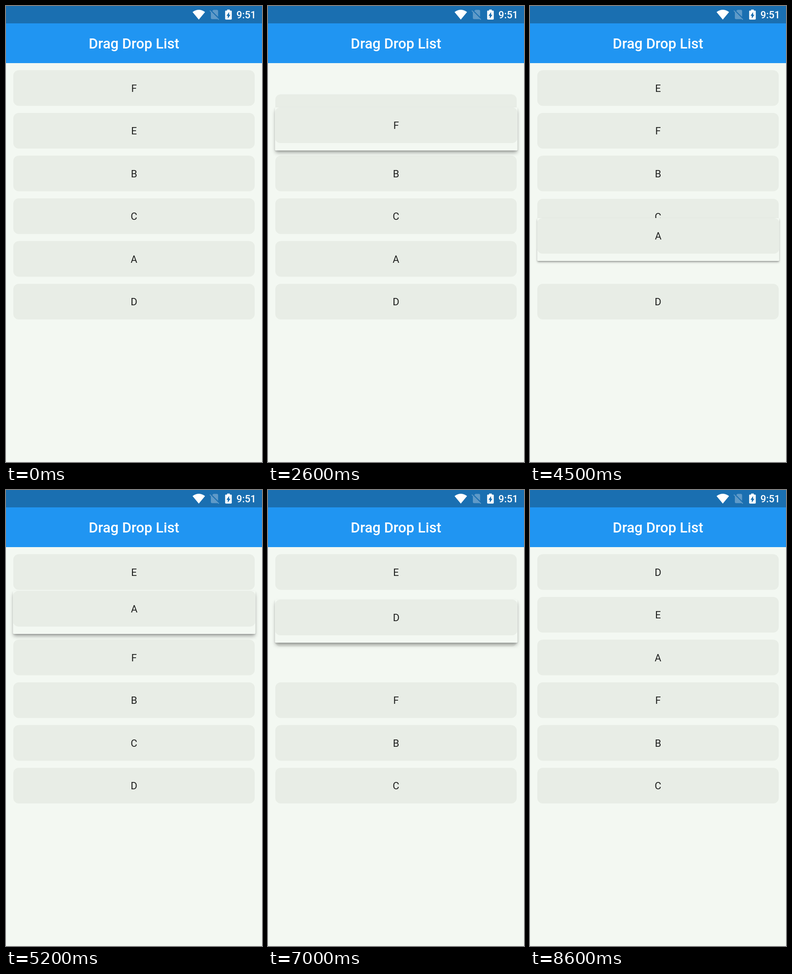
Animation, 561 px wide and 998 px high, one loop 8700 ms. Source, as an HTML page:

```html
<!DOCTYPE html>
<html lang="en">
<head>
<meta charset="utf-8">
<title>Drag Drop List</title>
<style>
  html, body { margin: 0; width: 100%; height: 100%; overflow: hidden; }
  body { position: relative; background: #f3f8f2; font-family: Roboto, sans-serif; }
  .status, .bar { position: absolute; left: 0; width: 561px; }
  .status { top: 0; height: 37.5px; background: #1a6fb1; z-index: 5; }
  .bar {
    top: 37.5px; height: 87px; background: #2095f2; color: #fff; z-index: 4;
    font-size: 31.2px; font-weight: 500; line-height: 89px; text-align: center;
  }
  .status svg { position: absolute; left: 0; top: 0; }
  .clock {
    position: absolute; right: 13px; top: 0; color: #fff;
    font-size: 21.8px; font-weight: 500; line-height: 40px;
  }
  .tile {
    position: absolute; left: 15.6px; top: 0; width: 529.8px; height: 93.5px;
    border-radius: 2px;
  }
  .tile.held { background: #f3f8f2; z-index: 2; }
  .card {
    height: 77.9px; border-radius: 12px; background: #e8ede6; color: #1c1d1c;
    font-size: 22px; line-height: 79px; text-align: center;
  }
</style>
</head>
<body>
<div class="status">
  <svg width="561" height="38" fill="#fff">
    <path d="M408.8 13.2Q422.5 3.4 436.2 13.2L422.5 29.8Z"/>
    <path transform="translate(443.3 5) scale(1.13)" opacity=".3" d="M19 5c0-1.1-.9-2-2-2h-7L7.66 5.34 19 16.68zM3.65 3.88 2.38 5.15 5 7.77V19c0 1.1.9 2 2 2h10c.35 0 .67-.1.96-.26l1.88 1.88 1.27-1.27z"/>
    <path transform="translate(470.1 5.6) scale(1.45 1.1)" d="M15.67 4H14V2h-4v2H8.33C7.6 4 7 4.6 7 5.33v15.34C7 21.4 7.6 22 8.33 22h7.34c.73 0 1.33-.6 1.33-1.33V5.33C17 4.6 16.4 4 15.67 4zM11 20v-5.5H9L13 7v5.5h2z"/>
  </svg>
  <div class="clock">9:51</div>
</div>
<div class="bar">Drag Drop List</div>
<script>
const LOOP = 8700, STEP = 100, PITCH = 93.5, SHIFT = 210;
const rowTop = row => 140.5 + row * PITCH;
const clamp = v => Math.min(1, Math.max(0, v));
const smooth = v => v * v * (3 - 2 * v);

// Each path lists [time, top] of the held tile.
const drags = [
  { from: 0, to: 1, lift: 2350, drop: 3100, path: [
    [2300, rowTop(0)], [2400, 152], [2500, 186], [2600, 222], [2700, 235],
    [2900, 237], [3100, rowTop(1)], [3500, rowTop(1)]] },
  { from: 4, to: 1, lift: 4370, drop: 5500, path: [
    [4300, rowTop(4)], [4400, 492], [4500, 464], [4600, 412], [4800, 308],
    [4900, 266], [5000, 238], [5100, 225], [5200, 220.8], [5500, 220.8],
    [5700, rowTop(1)], [5900, rowTop(1)]] },
  { from: 5, to: 0, lift: 6570, drop: 7550, path: [
    [6400, rowTop(5)], [6500, 555], [6600, 489], [6800, 350], [6900, 290],
    [7000, 240], [7100, 195], [7200, 162], [7300, 140], [7400, 131],
    [7500, 128.8], [7750, rowTop(0)], [7950, rowTop(0)]] }
];

function topAt(path, t) {
  const i = path.findIndex(p => p[0] > t);
  if (i < 0) return path[path.length - 1][1];
  if (i === 0) return path[0][1];
  const [t0, y0] = path[i - 1], [t1, y1] = path[i];
  return y0 + (y1 - y0) * (t - t0) / (t1 - t0);
}

// A row gives way once the held tile is half a row from its place.
for (const drag of drags) {
  drag.dir = Math.sign(drag.to - drag.from);
  drag.start = drag.path[0][0];
  drag.end = drag.path[drag.path.length - 1][0];
  drag.passed = {};
  for (let row = drag.from + drag.dir; row !== drag.to + drag.dir; row += drag.dir) {
    const edge = rowTop(row) - drag.dir * PITCH / 2;
    let t = drag.start;
    while (t < drag.end && drag.dir * (topAt(drag.path, t) - edge) < 0) t++;
    drag.passed[row] = t;
  }
}

const tiles = {};
for (const letter of "FEBCAD") {
  const tile = document.createElement("div");
  tile.className = "tile";
  tile.innerHTML = `<div class="card">${letter}</div>`;
  document.body.append(tile);
  tiles[letter] = tile;
}

function place(tile, y, height = 0, held = false) {
  tile.classList.toggle("held", held);
  tile.style.transform = `translateY(${y}px) scale(${1 + 0.003 * height})`;
  tile.style.boxShadow = height
    ? `0 ${6 * height}px ${8 * height}px ${-1.5 * height}px rgba(0,0,0,.34),` +
      `0 ${1.5 * height}px ${3 * height}px rgba(0,0,0,.15)`
    : "none";
}

function draw(t) {
  const order = [..."FEBCAD"];
  let active = null;
  for (const drag of drags) {
    if (t >= drag.end) order.splice(drag.to, 0, order.splice(drag.from, 1)[0]);
    else if (t >= drag.start) active = drag;
  }
  order.forEach((letter, row) => {
    const tile = tiles[letter];
    if (active && row === active.from) {
      const height = clamp((t - active.lift) / 250) * clamp(1 - (t - active.drop) / 400);
      place(tile, topAt(active.path, t), height, true);
    } else if (active && row in active.passed) {
      const moved = smooth(clamp((t - active.passed[row]) / SHIFT));
      place(tile, rowTop(row) - active.dir * PITCH * moved);
    } else {
      place(tile, rowTop(row));
    }
  });
}

const begin = performance.now();
function tick() {
  const t = (performance.now() - begin) % LOOP;
  draw(Math.floor(t / STEP) * STEP);
  requestAnimationFrame(tick);
}
tick();
</script>
</body>
</html>
```
